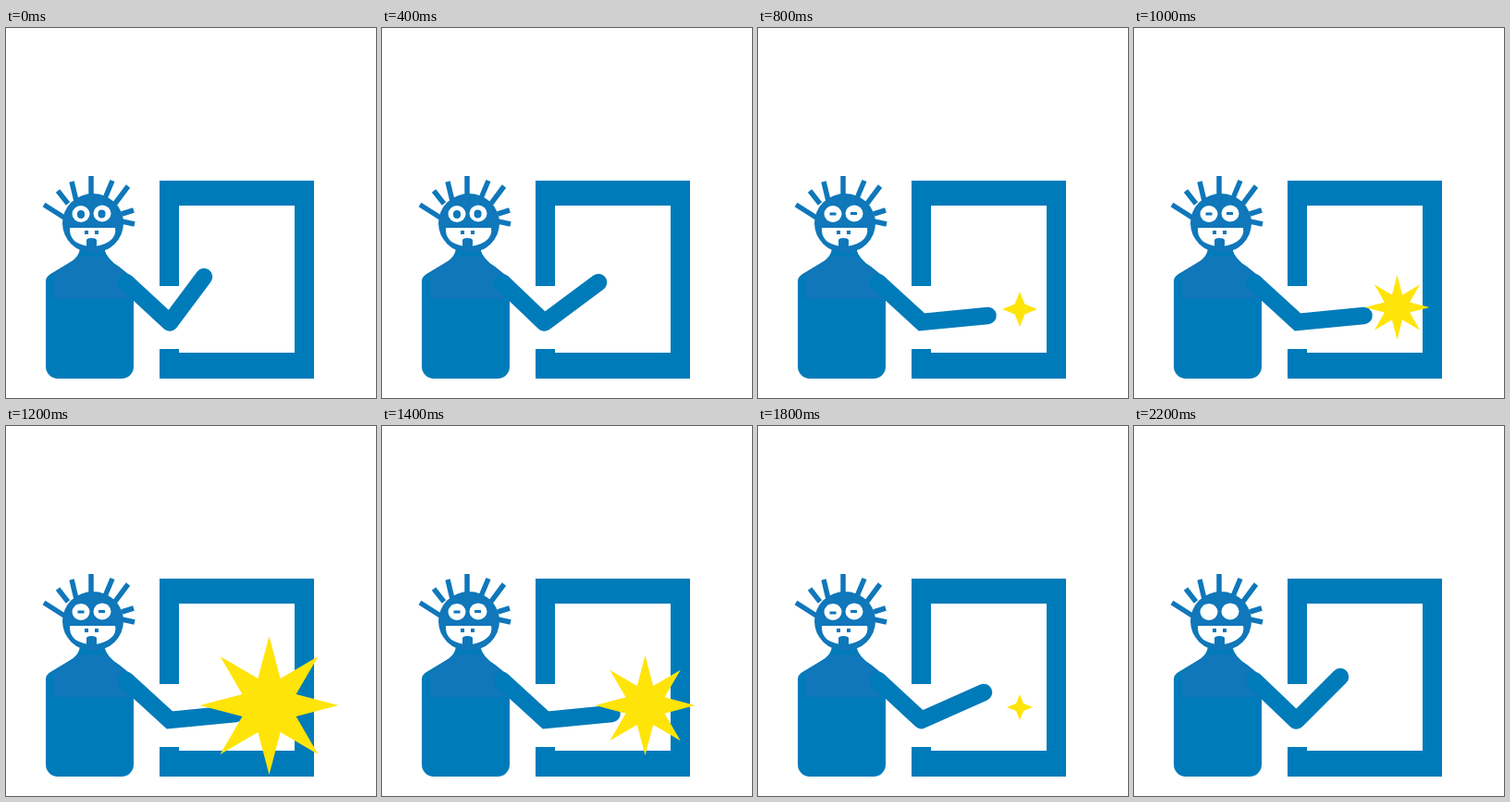
An HTML page for the animation above (2400 ms loop, 400 by 400 pixels).

```html
<!DOCTYPE html>
<html lang="en">
<head>
<meta charset="utf-8">
<title>Touch the window</title>
<style>
  html, body { margin: 0; width: 100%; height: 100%; overflow: hidden; background: #fff; }
  svg { display: block; width: 100vw; height: 100vh; }
  .line { fill: none; stroke: #007bba; }
  .shade { fill: #0f77ba; }
  .line.shade { fill: none; stroke: #0f77ba; }
</style>
</head>
<body>
<svg viewBox="0 0 400 400" fill="#007bba">
  <path d="M166 165H333V379H166V347H187V351H312V192H187V279H166Z"/>

  <!-- body and neck -->
  <path d="M80 238Q79 246 73 251L48 266Q43 269 43 274V366A13 13 0 0 0 56 379H125A13 13 0 0 0 138 366V271L122 258Q109 250 106 238Z"/>
  <path class="shade" d="M77 247L73 251L51 265V293H138V271L122 258Q113 253 109 247Z"/>
  <path class="line shade" stroke-width="5.5" d="M41 191L63 205M56 176L67 190M71 166L76 187M92 160V182M115 165L107 184M132 171L117 191M138 197L125 201M139 212L125 209"/>

  <!-- head -->
  <ellipse class="shade" cx="94" cy="211" rx="33" ry="32"/>
  <path fill="#fff" d="M69 216H118Q120 225 111 231Q103 236 93 236Q83 236 75 231Q68 225 69 216Z"/>
  <path class="shade" d="M85 219h4v4h-4zM96 219h4v4h-4zM87 237V229Q88 227 92 227Q97 227 98 229V237Z"/>
  <g fill="#fff">
    <ellipse cx="81" cy="201" rx="9.5" ry="9"/>
    <ellipse cx="104" cy="200.5" rx="9.5" ry="9"/>
  </g>
  <path id="pupils" class="line shade"/>

  <path id="arm" class="line" stroke-width="18.5" stroke-linecap="round"/>
  <path id="star" fill="#ffe40a"/>
</svg>
<script>
const STEP = 200;
const get = id => document.getElementById(id);

// Arm poses: elbow, then hand
const raised = [177, 318.5, 214, 269];
const lifted = [175.5, 318.5, 223, 271];
const middle = [175.5, 318.5, 234, 275];
const lowered = [176.5, 318, 244, 288];
const touching = [177, 318, 248.5, 311];

// Pupils as capped strokes: path and width
const eyes = {
  open: ["M81 201v1M103.5 200.5v1", 8],
  shut: ["M77.5 201h7M100 200.5h7", 3],
  tilted: ["M77.5 202h7M100 200.5h7", 3],
  blank: ["", 0]
};

// Each step: arm, eyes, star radius
const steps = [
  [raised, "open", 0],
  [lifted, "open", 0],
  [middle, "open", 0],
  [lowered, "open", 14],
  [touching, "shut", 19],
  [touching, "shut", 35],
  [touching, "shut", 75],
  [touching, "shut", 54],
  [touching, "shut", 35],
  [lowered, "tilted", 14],
  [middle, "open", 0],
  [lifted, "blank", 0]
];

function starPath(r) {
  if (!r) return "";
  const small = r < 20;
  const points = small ? 4 : 8;
  const inner = r * (small ? 0.4 : 0.42);
  const [cx, cy] = small ? [283, 304] : [284.5, 302];
  const corners = Array.from({ length: points * 2 }, (_, i) => {
    const a = i * Math.PI / points - Math.PI / 2;
    const d = i % 2 ? inner : r;
    return [cx + d * Math.cos(a), cy + d * Math.sin(a)].map(v => v.toFixed(1));
  });
  return "M" + corners.join("L") + "Z";
}

function draw(now) {
  const [pose, look, radius] = steps[Math.floor(now / STEP) % steps.length];
  const [ex, ey, hx, hy] = pose;
  get("arm").setAttribute("d", `M130 275L${ex} ${ey}L${hx} ${hy}`);
  get("arm").setAttribute("stroke-linejoin", pose === touching ? "miter" : "round");

  const [shape, width] = eyes[look];
  get("pupils").setAttribute("d", shape);
  get("pupils").setAttribute("stroke-width", width);
  get("pupils").setAttribute("stroke-linecap", look === "open" ? "round" : "butt");

  get("star").setAttribute("d", starPath(radius));
}

const start = performance.now();
function tick() {
  draw(performance.now() - start);
  requestAnimationFrame(tick);
}
tick();
</script>
</body>
</html>
```
